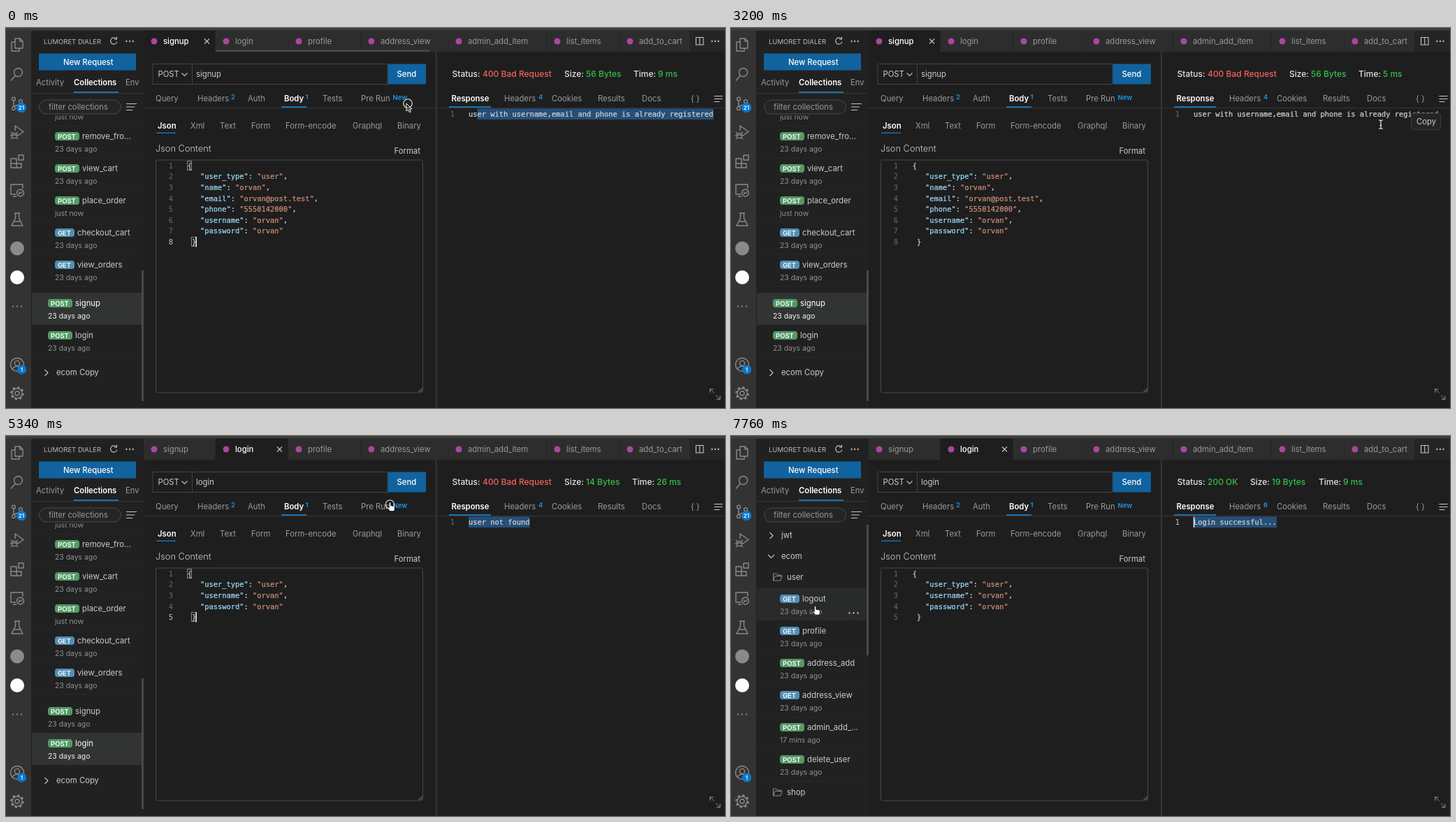
An HTML page for the animation above (8 s loop, 1029 by 544 pixels).

```html
<!DOCTYPE html>
<html lang="en">
<head>
<meta charset="utf-8">
<title>API client</title>
<style>
html, body { margin: 0; width: 100%; height: 100%; overflow: hidden; background: #1e1e1e; }
svg { display: block; width: 100%; height: 100%; }
text { font: 400 11.3px Inter, "Open Sans", sans-serif; fill: #ccc; white-space: pre; }
.dim { fill: #9a9a9a; }
.on { fill: #fff; }
.b { font-weight: 600; fill: #fff; }
.mid { font-weight: 500; fill: #fff; }
.date { font-size: 10.4px; fill: #919191; }
.date.on { fill: #f0f0f0; }
.head { font-size: 9.5px; fill: #bbb; }
.tag { font-size: 9.5px; font-weight: 600; fill: #fff; }
.sup { font-size: 9.5px; font-weight: 600; fill: #2196e3; }
.badge { font-size: 8px; font-weight: 600; fill: #fff; text-anchor: middle; }
.title { font-size: 12.8px; font-weight: 300; }
.stat { font-size: 12px; font-weight: 500; fill: #e4e4e4; }
.good { fill: #35c04a; }
.bad { fill: #f4605f; }
.mono, .num { font: 400 10.4px "DejaVu Sans Mono", "Liberation Mono", monospace; fill: #d4d4d4; }
.mono { stroke: #d4d4d4; stroke-width: .22; }
.num { fill: #6a6a6a; text-anchor: middle; }
.num.on { fill: #c6c6c6; }
.key { fill: #9cdcfe; stroke: #9cdcfe; }
.str { fill: #ce9178; stroke: #ce9178; }
.ico { fill: none; stroke: #8a8a8a; stroke-width: 1.4; stroke-linejoin: round; }
.line { fill: none; stroke: #c5c5c5; stroke-width: 1.1; }
.thin { fill: none; stroke: #999; stroke-width: .9; }
</style>
</head>
<body>
<svg id="stage" viewBox="0 0 1029 544">
  <defs><clipPath id="list"><rect x="37" y="125.5" width="160" height="408.5"/></clipPath></defs>
  <g id="frame"></g>
  <g id="live"></g>
</svg>
<script>
const LOOP = 8000, CHAR = 6.261, BOTTOM = 478, USER = 'orvan';

const text = (x, y, s, cls = '') => `<text x="${x}" y="${y}" class="${cls}">${s}</text>`;
const rect = (x, y, w, h, fill, more = '') =>
  `<rect x="${x}" y="${y}" width="${w}" height="${h}" fill="${fill}" ${more}/>`;
const box = (x, y, w, h, stroke, r = 0, fill = 'none') => rect(x, y, w, h, fill, `stroke="${stroke}" rx="${r}"`);
const path = (d, cls = 'line') => `<path d="${d}" class="${cls}"/>`;
const disc = (x, y, r, fill) => `<circle cx="${x}" cy="${y}" r="${r}" fill="${fill}"/>`;
const ring = (x, y, r, more = '') => `<circle cx="${x}" cy="${y}" r="${r}" ${more}/>`;
const dots = (x, y, gap, fill) => [0, 1, 2].map(i => disc(x + i * gap, y, 1.15, fill)).join('');

// ---------- fixed parts ----------

const icons = {
  24: path('M7 1h7l4 4v10H7zM14 1v4h4M7 6H2v13h11v-4', 'ico'),
  66: ring(11.5, 7.5, 6) + path('M7.5 12L1 19.5', 'ico'),
  108: ring(5, 3.5, 2.4) + ring(5, 17, 2.4) + ring(15, 7, 2.4) + path('M5 6v8.5M15 9.5c0 4-9 2-9.7 5', 'ico'),
  149: path('M7 8V1l12 8.5-8 5.5M3 12l-2-2M9 12l2-2M2 15H0M10 15h2M3 18l-2 2M9 18l2 2M3 14h6', 'ico') + ring(6, 15, 3.6),
  191: path('M1 6h8v7H1zM1 13h8v6H1zM9 13h7v6H9zM12 1h7v7h-7z', 'ico'),
  232: path('M8 16H1V2h17v6M4 19h5M12 13l2 1.5-2 1.5M17 12l-2 1.5 2 1.5', 'ico') + ring(14.5, 14, 5),
  274: path('M6 1h8M7.5 1v7L2 19h16L12.5 8V1M5.5 13h9', 'ico'),
  482: ring(10, 10, 9.5) + ring(10, 8, 3.6) + path('M3.5 16.5c1-5.5 12-5.5 13 0', 'ico'),
  523: ring(10, 10, 3) + ring(10, 10, 7) + ring(10, 10, 8.6, 'stroke-width="2.4" stroke-dasharray="3.2 3.55"')
};

const activity = () =>
  Object.entries(icons).map(([y, art]) => `<g class="ico" transform="translate(6 ${y - 10})">${art}</g>`).join('') +
  disc(16, 315.5, 10, '#8a8a8a') + disc(16, 357, 10, '#fff') + dots(10, 398.5, 6, '#8a8a8a') +
  disc(22, 114, 7.2, '#0a78cc') + text(22, 117, '21', 'badge') +
  disc(22.5, 489, 6.6, '#0a78cc') + text(22.5, 492, '1', 'badge');

const sideTop = () =>
  text(54, 22.5, 'LUMORET DIALER', 'head') +
  path('M157.8 15.5a4.6 4.6 0 1 0 1 4M158.5 12.5v3.5h-3.6') + dots(172.5, 19, 4.6, '#c5c5c5') +
  rect(47, 36.5, 139, 24, '#11639f') + text(82, 52.5, 'New Request', 'mid') +
  text(43, 82, 'Activity', 'dim') + text(97, 82, 'Collections', 'b') + text(171, 82, 'Env', 'dim') +
  rect(37, 93, 160, 1, '#353535') + rect(97, 91, 64, 2, '#1a70b0') +
  box(47.5, 103, 117, 20, '#4a4a4a', 10, '#252526') + text(61, 117, 'filter collections', 'dim') +
  path('M172 108.5h15M172 113h12M172 117.5h9');

const request = () =>
  box(210, 51.5, 336, 29, '#434343') + rect(266, 51.5, 1, 29, '#434343') +
  text(217.5, 70, 'POST') + path('M251.5 64.5l4 4 4-4') +
  rect(197, 114, 418, 1, '#343434') + rect(394, 112, 36, 2, '#1a70b0') +
  [[214, 'Query'], [274, 'Headers'], [346, 'Auth'], [453, 'Tests'], [508, 'Pre Run']]
    .map(([x, s]) => text(x, 105, s, 'dim')).join('') +
  text(398, 105, 'Body', 'b') + text(322, 102, '2', 'sup') + text(428.5, 102, '1', 'sup') + text(553.5, 102.5, 'New', 'sup') +
  text(217, 143.5, 'Json', 'b') + rect(215, 149.5, 28, 1.5, '#1a70b0') +
  [[264, 'Xml'], [306, 'Text'], [351, 'Form'], [400, 'Form-encode'], [496, 'Graphql'], [560, 'Binary']]
    .map(([x, s]) => text(x, 143.5, s, 'dim')).join('') +
  text(214, 177, 'Json Content', 'title') + text(555.5, 180, 'Format') +
  box(214.5, 189, 382, 333, '#464646', 2) + path('M590.5 521l5.5-5.5M593.5 521l2.5-2.5', 'thin');

const panel = () =>
  rect(615, 34, 1.5, 510, '#3b3b3b') + rect(617, 114, 412, 1, '#343434') + rect(634, 112, 60, 2, '#1a70b0') +
  text(637.5, 105, 'Response', 'b') +
  [[713, 'Headers'], [781, 'Cookies'], [847, 'Results'], [910, 'Docs'], [980, '{ }']]
    .map(([x, s]) => text(x, 105, s, 'dim')).join('') +
  path('M1013.5 97.5h12M1013.5 101.5h12M1013.5 105.5h8');

document.getElementById('frame').innerHTML =
  rect(0, 0, 1029, 544, '#1e1e1e') + rect(0, 0, 36, 544, '#333') + rect(36, 0, 161, 544, '#212121') +
  rect(197, 0, 832, 34, '#252526') + rect(0, 0, 1029, 3.5, '#3e3e3e') +
  activity() + sideTop() + request() + panel();

// ---------- changing parts ----------

const tabs = [
  [197, 103, 'signup'], [300, 104, 'login'], [404, 104, 'profile'], [508, 125, 'address_view'],
  [633, 141, 'admin_add_item'], [774, 104, 'list_items'], [878, 101, 'add_to_cart']
];

function tabBar(s) {
  return tabs.map(([x, w, name]) => {
    const on = name === s.tab;
    return rect(x, 3.5, w - 1, 30.5, on ? '#1e1e1e' : '#2d2d2d') + disc(x + 15, 19, 4.5, '#a9479f') +
      text(x + 28, 23, name, on ? 'mid' : 'dim') +
      (on ? path(`M${x + w - 16} 15.5l7 7m0 -7l-7 7`) : '');
  }).join('') +
    (s.bar ? rect(300, 31.5, 306, 2.5, '#4b4b4b') : '') +
    path('M987.5 13.5h10.5v10.5h-10.5zM992.8 13.5v10.5') + dots(1010.5, 19, 4.5, '#c5c5c5');
}

const calls = (x, y, rows) => rows.map(([method, name, date = '23 days ago'], i) =>
  ({ x, y: y + i * 46, method, name, date }));

const tree = [
  ...calls(70, 233, [['GET', 'logout'], ['GET', 'profile'], ['POST', 'address_add'], ['GET', 'address_view'],
    ['POST', 'admin_add_...', '17 mins ago'], ['POST', 'delete_user']]),
  ...calls(70, 541, [['GET', 'list_items'], ['POST', 'add_to_cart', 'just now'], ['POST', 'remove_fro...'],
    ['POST', 'view_cart'], ['POST', 'place_order', 'just now'], ['GET', 'checkout_cart'], ['GET', 'view_orders']]),
  ...calls(60, 872, [['POST', 'signup'], ['POST', 'login']])
];

function callRow(c, s) {
  const on = c.x === 60 && c.name === s.tab, over = c.name === s.over, post = c.method === 'POST';
  return (on || over ? rect(37, c.y - 15, 157, 46, on ? '#323434' : '#292b2b') : '') +
    rect(37, c.y + 30.5, 157, 1, '#292929') +
    rect(c.x, c.y - 6, post ? 35 : 28, 12, post ? '#539a68' : '#5090b6', 'rx="4"') +
    text(c.x + 4, c.y + 3.6, c.method, 'tag') +
    text(c.x + (post ? 39 : 32), c.y + 4, c.name, on ? 'on' : '') +
    text(c.x, c.y + 22, c.date, on ? 'date on' : 'date') +
    (over ? dots(169.5, c.y + 20.5, 6, '#ccc') : '');
}

const folder = (y, name) => text(80, y + 4, name) +
  path(`M60.5 ${y + 5}v-10h4.5l1.5 2h5v2M60.5 ${y + 5}l2.5 -6.5h10l-2.2 6.5z`, 'thin');
const group = (y, name, open) => text(72, y + 4, name) +
  path(open ? `M53 ${y - 2}l4.5 4.5 4.5 -4.5` : `M55.5 ${y - 4}l4.5 4.5 -4.5 4.5`);

function sidebar(s) {
  return `<g clip-path="url(#list)"><g transform="translate(0 ${-s.scroll})">` +
    tree.map(c => callRow(c, s)).join('') + folder(202, 'user') + folder(510, 'shop') +
    group(142, 'jwt') + group(172, 'ecom', true) + group(971, 'ecom Copy') + '</g></g>' +
    rect(194, 127 + s.scroll / BOTTOM * 220, 3, 187, '#4a4a4a');
}

const login = [['user_type', 'user'], ['username', USER], ['password', USER]];
const bodies = {
  login,
  signup: [login[0], ['name', USER], ['email', USER + '@post.test'], ['phone', '5550142000'], login[1], login[2]]
};

function editor(s) {
  const rows = bodies[s.tab], last = rows.length + 1, y = i => 200.7 + i * 15.6;
  let out = '';
  for (let i = 0; i <= last; i++) out += text(236, y(i), i + 1, s.focus && i === last ? 'num on' : 'num');
  if (s.focus) {
    out += box(259.5, 190.5, 6, 13, '#8a8a8a') + box(265.5, y(last) - 10.5, 6, 13, '#8a8a8a') +
      rect(271.5, y(last) - 11, 1.5, 14.5, '#ddd');
  }
  out += text(259.7, y(0), '{', 'mono') + text(265.9, y(last), '}', 'mono');
  rows.forEach(([k, v], i) => {
    out += text(278, y(i + 1), `<tspan class="key">"${k}"</tspan>: <tspan class="str">"${v}"</tspan>` +
      (i < rows.length - 1 ? ',' : ''), 'mono');
  });
  return out;
}

const answer = (status, size, time, timeX, body, heads = 4) => ({ status, size, time, timeX, body, heads });
const BAD = '400 Bad Request', OK = '200 OK', TAKEN = 'user with username,email and phone is already registered';
const replies = {
  before: answer(BAD, 56, 9, 898, TAKEN),
  created: answer(OK, 48, 58, 843, `user created: ${USER}, please go to login page ...`),
  taken: answer(BAD, 56, 5, 898, TAKEN),
  missing: answer(BAD, 14, 26, 896, 'user not found'),
  welcome: answer(OK, 19, 9, 841, 'Login successful...', 6)
};

function response(s) {
  const r = replies[s.reply];
  if (!r) {
    return text(638.5, 70, 'Status:', 'stat') + text(699, 70, 'Size:', 'stat') + text(747, 70, 'Time:', 'stat') +
      text(762, 102, '4', 'sup');
  }
  const sizeX = r.status === OK ? 743 : 799, end = 662 + r.body.length * CHAR, from = 662 + s.sel * CHAR;
  return text(638.5, 70, 'Status:', 'stat') + text(682, 70, r.status, r.status === OK ? 'stat good' : 'stat bad') +
    text(sizeX, 70, 'Size:', 'stat') + text(sizeX + 31, 70, r.size + ' Bytes', 'stat good') +
    text(r.timeX, 70, 'Time:', 'stat') + text(r.timeX + 35, 70, r.time + ' ms', 'stat good') +
    text(762, 102, r.heads, 'sup') +
    (s.caret ? box(618, 115.5, 412, 15.5, '#232323') : '') +
    (s.sel >= 0 ? rect(from, 115.4, end - from, 15.6, '#264f78') : '') +
    text(639, 127, 1, s.caret ? 'num on' : 'num') + text(662, 127, r.body, 'mono') +
    (s.caret ? rect(s.caret === 'end' ? end : 661.7, 115.4, 1.6, 15.6, '#ddd') : '') +
    (s.copy ? box(973.5, 122, 42, 23.5, '#3e3e3e', 3, '#242424') + text(981, 138, 'Copy') : '') +
    path('M1007.5 522v-5h5M1007.5 517l6 5.5M1022 526.5v5h-5M1022 531.5l-6-5.5', 'thin');
}

const send = s => rect(546.5, 51.5, 54.5, 29, s.hot ? '#1374b8' : '#11639f') + text(559.5, 70, 'Send', 'mid') +
  text(272, 69.5, s.tab);

const shapes = {
  arrow: '<path d="M0 0v11l2.5-2.3 1.8 4 1.9-.8-1.8-3.9h3.5z" fill="#111" stroke="#fff" stroke-width="1"/>',
  hand: '<path transform="scale(1.15 1.05)" d="M-1.2 1.2c0-1.8 2.4-1.8 2.4 0v3.2l4 .9c1 .3 1.2 1 1 2l-.8 4.8h-5.2l-3.8-4.6c-.5-1 .7-1.6 1.4-.9l1 1z" fill="#fff" stroke="#111" stroke-width=".9"/>',
  beam: '<path d="M-2.8-6.2q2.4 0 2.8 1.4q.4-1.4 2.8-1.4M0-5v10M-2.8 6.2q2.4 0 2.8-1.4q.4 1.4 2.8 1.4M-1.5 1.5h3" fill="none" stroke="#eee" stroke-width="1.2"/>'
};

function pointer([kind, x, y, click]) {
  const dy = kind === 'hand' ? 3 : 0;
  return `<g transform="translate(${x} ${y})">${shapes[kind]}` +
    (click ? ring(kind === 'arrow' ? 2 : 0, dy, 6.3, 'fill="none" stroke="#eee" stroke-width="1.1"') : '') + '</g>';
}

// Each step changes only what it names; the rest carries on.
const steps = [
  [0, { tab: 'signup', reply: 'before', sel: 2, caret: '', focus: true, bar: true, hot: false, copy: false,
    over: '', scroll: BOTTOM, at: ['arrow', 573, 108, true] }],
  [260, { bar: false, hot: true, at: ['hand', 599, 68] }],
  [530, { focus: false, at: ['hand', 599, 68, true] }],
  [800, { hot: false, reply: 'created', sel: -1, copy: true, at: ['beam', 674, 150] }],
  [1070, { caret: 'end', at: ['beam', 961, 125] }],
  [1340, { sel: 0, caret: 'start', at: ['beam', 655, 106, true] }],
  [1600, { copy: false, at: ['beam', 280.5, 361] }],
  [1870, { over: 'signup', at: ['hand', 152, 400] }],
  [2140, { over: '', at: ['beam', 360, 280] }],
  [2400, { at: ['arrow', 545, 142] }],
  [2670, { hot: true, at: ['hand', 575, 68] }],
  [2930, { caret: '', at: ['hand', 575, 68, true] }],
  [3200, { hot: false, reply: 'taken', sel: -1, copy: true, at: ['beam', 930, 138] }],
  [3470, { caret: 'end', at: ['beam', 1010, 118] }],
  [3740, { sel: 0, caret: 'start', at: ['beam', 538, 195] }],
  [4010, { copy: false, over: 'login', at: ['hand', 75, 435] }],
  [4270, { at: ['hand', 136, 445.5] }],
  [4540, { tab: 'login', reply: 'missing', caret: '', over: '', at: ['beam', 277, 324] }],
  [4810, { at: ['beam', 464, 185] }],
  [5080, { focus: true, at: ['beam', 593, 282] }],
  [5340, { at: ['hand', 549.5, 95, true] }],
  [5610, { hot: true, at: ['hand', 575, 68] }],
  [5880, { focus: false, reply: '', sel: -1, at: ['hand', 575, 68, true] }],
  [6150, { hot: false, reply: 'welcome', copy: true, at: ['beam', 776, 138] }],
  [6420, { sel: 0, caret: 'start', at: ['beam', 659.5, 126, true] }],
  [6690, { copy: false, at: ['beam', 430, 203] }],
  [6950, { over: 'remove_fro...', at: ['hand', 109, 160] }],
  [7220, { over: '', scroll: 200, at: ['hand', 121, 229] }],
  [7490, { scroll: 0 }],
  [7760, { over: 'logout', at: ['hand', 120.5, 243.5] }]
];

let state = {};
const scenes = steps.map(([time, change]) => ({ time, ...(state = { ...state, ...change }) }));
const live = document.getElementById('live');
let shown;

function tick() {
  const t = performance.now() % LOOP;
  const s = scenes.findLast(scene => scene.time <= t);
  if (s !== shown) {
    shown = s;
    live.innerHTML = [tabBar, sidebar, send, editor, response].map(part => part(s)).join('') + pointer(s.at);
  }
  requestAnimationFrame(tick);
}
tick();
</script>
</body>
</html>
```
